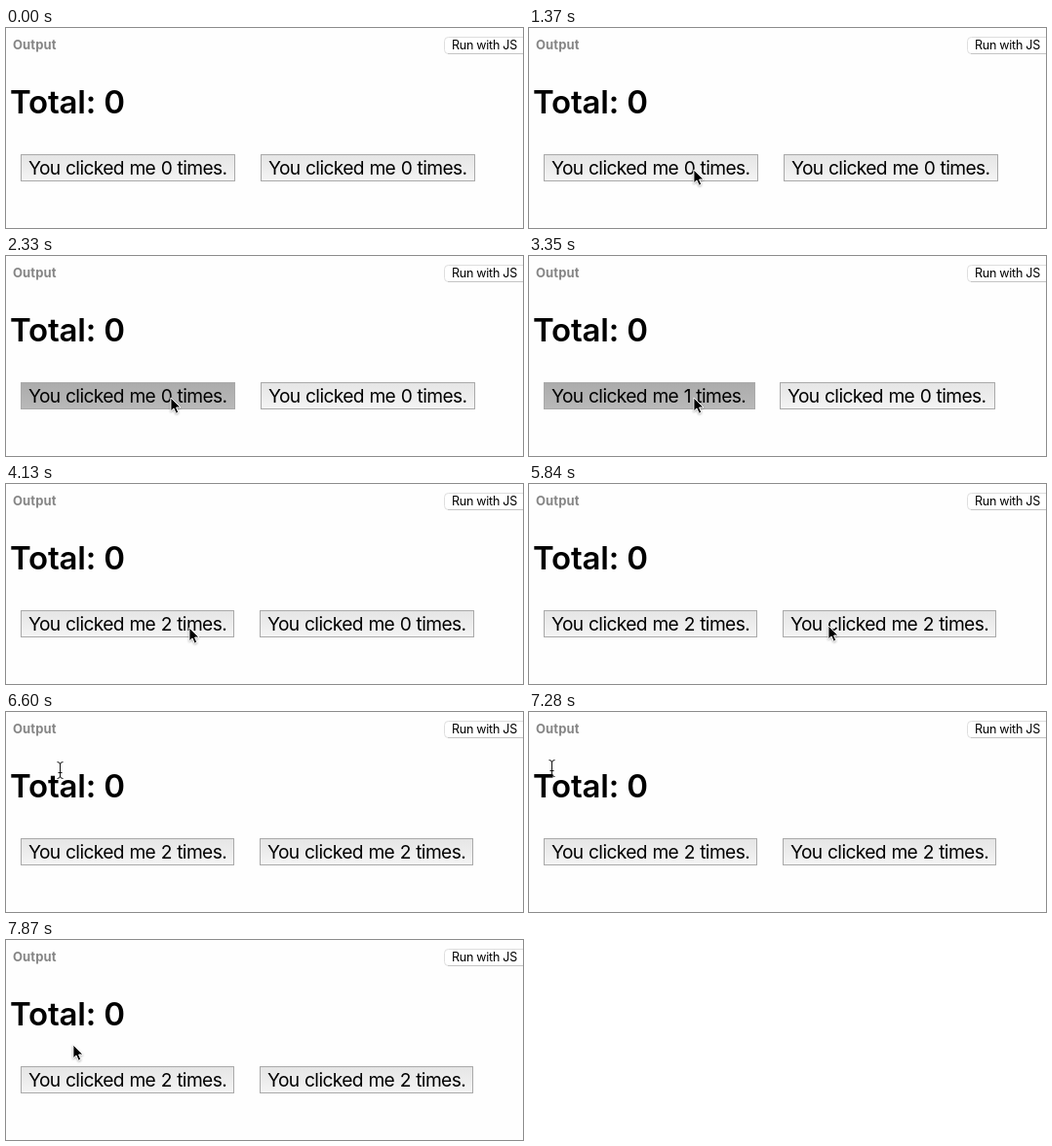
An HTML page that plays this animation: 530x206 px, repeating every 7.99 s.

```html
<!DOCTYPE html>
<html lang="en">
<head>
<meta charset="utf-8">
<title>Click counters</title>
<style>
  html, body { margin: 0; width: 100%; height: 100%; overflow: hidden; background: #fefefe; }
  svg { display: block; font-family: Inter, "Open Sans", sans-serif; }
  .label { font-size: 13px; font-weight: 700; fill: #868686; letter-spacing: .1px; }
  .run { font-size: 12.5px; letter-spacing: -.25px; }
  .total { font-size: 33px; font-weight: 560; letter-spacing: -.2px; }
  .count { font-size: 19.2px; letter-spacing: -.62px; word-spacing: .7px; }
  .button rect { stroke: #a9a9a9; }
  #arrow { filter: drop-shadow(0 1px 1px rgba(0, 0, 0, .3)); }
</style>
</head>
<body>
<svg width="530" height="206" viewBox="0 0 530 206">
  <defs>
    <linearGradient id="up" x2="0" y2="1">
      <stop offset="0" stop-color="#e5e5e5"/><stop offset="1" stop-color="#f4f4f4"/>
    </linearGradient>
    <linearGradient id="down" x2="0" y2="1">
      <stop offset="0" stop-color="#ababab"/><stop offset="1" stop-color="#b9b9b9"/>
    </linearGradient>
  </defs>

  <text class="label" x="7" y="22">Output</text>
  <rect x="449.5" y="9.5" width="90" height="17" rx="4" fill="#fff" stroke="#dedede"/>
  <path d="M453 26.5H530" stroke="#c4c4c4"/>
  <text class="run" x="457" y="22">Run with JS</text>
  <text class="total" x="4" y="88">Total: 0</text>

  <g class="button"><rect x=".5" y="130.5" height="27"/><text class="count" x="8" y="151"></text></g>
  <g class="button"><rect x=".5" y="130.5" height="27"/><text class="count" x="8" y="151"></text></g>

  <path id="arrow" d="M.9 1V14.8L4 11.9L6.3 17.2L8.8 16.1L6.6 11H11Z"
        stroke="#fff" stroke-linejoin="round"/>
  <path id="beam" d="M-2.5 -8.5Q.5 -8.5 .5 -6Q.5 -8.5 3.5 -8.5M.5 -6.5V6.5M-2.5 8.5Q.5 8.5 .5 6Q.5 8.5 3.5 8.5M-1.5 2.5H2.5"
        fill="none" stroke="#111"/>
</svg>
<script>
const LOOP = 7990;
const LEFT = 15, GAP = 25.7;
const WIDTH = [220.2, 216.7, 219];  // button width by count

// Press and release times per button
const CLICKS = [
  [[2330, 2450], [3350, 3470]],
  [[4830, 5000], [5540, 5840]]
];

// Straight travel with a sine-shaped sideways bend
const glide = (from, to, bend = [0, 0], halves = 1) => u =>
  from.map((a, k) => a + (to[k] - a) * u + bend[k] * Math.sin(Math.PI * halves * u));

// Widening turns around the heading
const circle = u => {
  const angle = -.1 - 8.7 * u, r = .4 + .6 * u;
  return [62 + 48 * r * Math.cos(angle), 70 + 20 * r * Math.sin(angle)];
};

const rest = [165, 145], first = [168, 145], second = [306, 145], heading = [112, 83];
const MOVES = [
  { start: 500, end: 1250, steps: 14, path: glide([118, 195], rest, [3, -6]) },
  { start: 1310, end: 1370, steps: 2, path: glide(rest, first) },
  { start: 4130, end: 4530, steps: 8, path: glide(first, second, [2, 3], 2) },
  { start: 6080, end: 6190, steps: 3, path: glide(second, heading) },
  { start: 6490, end: 7280, steps: 15, path: circle },
  { start: 7330, end: 7870, steps: 10, path: glide(circle(1), [68, 107], [100, 0]) }
];

const arrow = document.querySelector("#arrow");
const beam = document.querySelector("#beam");
const buttons = [...document.querySelectorAll(".button")];

function pointer(t) {
  const move = MOVES.filter(m => t >= m.start).pop();
  if (!move) return null;
  const progress = Math.min(1, (t - move.start) / (move.end - move.start));
  const step = Math.floor(progress * (move.steps - 1) + .1);
  return move.path((step + 1) / move.steps);
}

function drawButtons(t) {
  let x = LEFT;
  buttons.forEach((button, i) => {
    const count = CLICKS[i].filter(([, up]) => t >= up).length;
    const pressed = CLICKS[i].some(([down, up]) => t >= down && t < up);
    const [rect, text] = button.children;
    const left = Math.round(x), right = Math.round(x + WIDTH[count]);
    button.setAttribute("transform", `translate(${left})`);
    rect.setAttribute("width", right - left - 1);
    rect.setAttribute("fill", pressed ? "url(#down)" : "url(#up)");
    text.textContent = `You clicked me ${count} times.`;
    x += WIDTH[count] + GAP;
  });
}

function place(el, at, visible) {
  el.style.display = visible ? "" : "none";
  if (visible) el.setAttribute("transform", `translate(${at.map(Math.round)})`);
}

function drawPointer(t) {
  const at = pointer(t);
  const overText = at && at[0] < 121 && at[1] < 97;
  place(arrow, at, at && !overText);
  place(beam, at, overText);
}

function frame(now) {
  const t = now % LOOP;
  drawButtons(t);
  drawPointer(t);
  requestAnimationFrame(frame);
}
frame(0);
</script>
</body>
</html>
```
